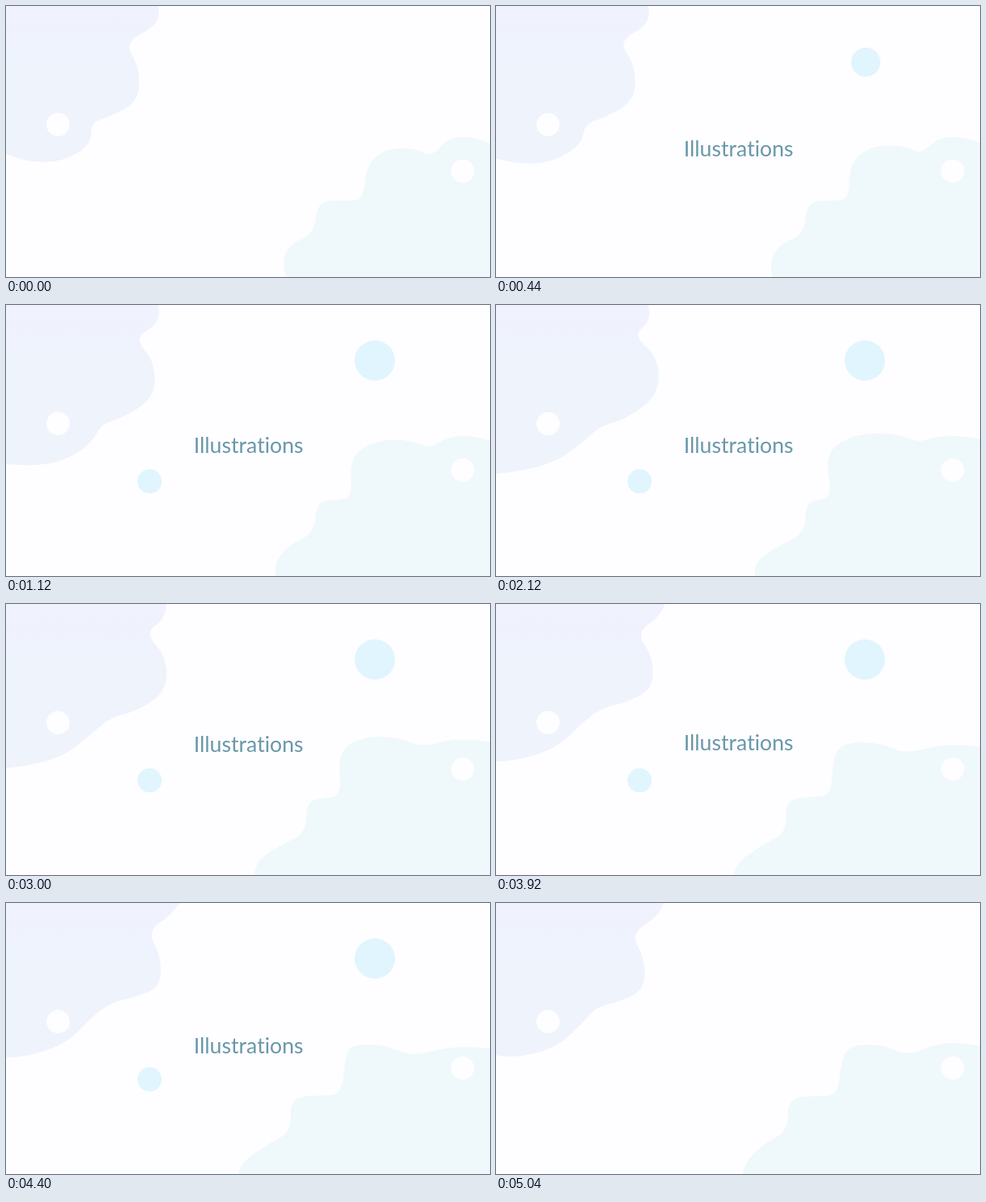
Animation, 600 px wide and 337 px high, one loop 5240 ms. Source, as an HTML page:

```html
<!DOCTYPE html>
<html lang="en">
<head>
<meta charset="utf-8">
<title>Illustrations</title>
<style>
html, body { margin: 0; width: 100%; height: 100%; overflow: hidden; background: #fefdff; }
svg { display: block; width: 600px; height: 337px; }
text {
  font: 400 26.67px Lato, sans-serif;
  font-variant-ligatures: none;
  fill: #6998a9;
  text-anchor: middle;
}
</style>
</head>
<body>
<svg viewBox="0 0 600 337">
  <defs>
    <linearGradient id="sky" gradientUnits="userSpaceOnUse" x1="0" y1="0" x2="0" y2="200">
      <stop offset="0" stop-color="#f0f2fe"/>
      <stop offset=".4" stop-color="#eef3fc"/>
    </linearGradient>
  </defs>
  <rect width="600" height="337" fill="#fefdff"/>
  <path id="left" fill="url(#sky)"/>
  <path id="right" fill="#eff8fb"/>
  <circle cx="64.5" cy="147.5" r="14.5" fill="#fefdff"/>
  <circle cx="566" cy="205.2" r="14.5" fill="#fefdff"/>
  <circle id="big" fill="#e0f5fd"/>
  <circle id="small" fill="#e0f5fd"/>
  <text id="label" x="300.7">Illustrations</text>
</svg>
<script>
const LOOP = 5240, MORPH = 2200;
const el = id => document.getElementById(id);
const ramp = (t, a, b) => Math.min(1, Math.max(0, (t - a) / (b - a)));
const mix = (a, b, p) => a + (b - a) * p;
const mixPoint = (a, b, p) => a.map((v, i) => mix(v, b[i], p));
const points = s => s.split(" ").map(p => p.split(",").map(Number));

// Key points of each blob's control polygon in its three poses.
const left = [
  "185,-16 193,22 146,45 165,75 165,119 125,139 105,145 106,172 70,194 24,194 -24,174",
  "185,-16 193,20 170,37 203,65 203,112 161,143 131,150 107,171 74,195 32,207 -32,215",
  "223,-13 207,13 175,35 192,66 192,103 164,116 132,123 108,140 74,176 18,193 -18,190"
].map(points);
const right = [
  "621,181 583,163 549,163 528,188 508,177 472,177 447,197 443,241 424,242 386,242 382,284 347,298 343,330 356,350",
  "621,171 583,163 549,163 522,171 497,159 446,159 406,182 416,238 398,243 384,247 383,284 352,299 321,317 319,347",
  "621,183 583,179 549,179 503,191 469,176 429,176 421,190 416,239 390,239 352,242 354,284 328,298 292,322 284,350"
].map(points);

// Rounds the polygon with quadratics that meet halfway along its edges.
function round(pts, corner) {
  const mids = pts.slice(1).map((p, i) => mixPoint(pts[i], p, 0.5));
  const arcs = mids.slice(1).map((m, i) => `Q${pts[i + 1]} ${m}`);
  return `M${pts[0]}L${mids[0]}${arcs.join("")}L${pts[pts.length - 1]}L${corner}Z`;
}

function blob(id, poses, corner, t) {
  const k = Math.floor(t / MORPH), p = t / MORPH - k;
  const next = poses[(k + 1) % 3];
  const pts = poses[k % 3].map((a, i) => mixPoint(a, next[i], p));
  el(id).setAttribute("d", round(pts, corner));
}

function disc(id, s, from, to, r) {
  const [cx, cy] = mixPoint(from, to, s);
  for (const [key, v] of Object.entries({ cx, cy, r: r * s })) el(id).setAttribute(key, v);
}

// A tossed path that peaks at mid and is back at rest half a span later.
const hop = (t, mid, half) => 7.5 * (((t - mid) / half) ** 2 - 1);

function lift(t) {
  if (t < 1090) return hop(t, 790, 300);
  return t > 3880 ? hop(t, 4120, 240) : 0;
}

function draw(t) {
  blob("left", left, [-30, -30], t);
  blob("right", right, [640, 350], t);

  const out = 1 - ramp(t, 4440, 4840);
  disc("big", ramp(t, 0, 610) * out, [461.5, 72], [457.2, 69], 25);
  disc("small", ramp(t, 500, 1080) * out, [179.6, 221.4], [178, 219.3], 15);

  el("label").setAttribute("y", 184 + lift(t));
  el("label").setAttribute("opacity", ramp(t, 0, 380) * (1 - ramp(t, 4430, 4720)));
}

let start;
function tick(now) {
  start ??= now;
  draw((now - start) % LOOP);
  requestAnimationFrame(tick);
}
draw(0);
requestAnimationFrame(tick);
</script>
</body>
</html>
```
